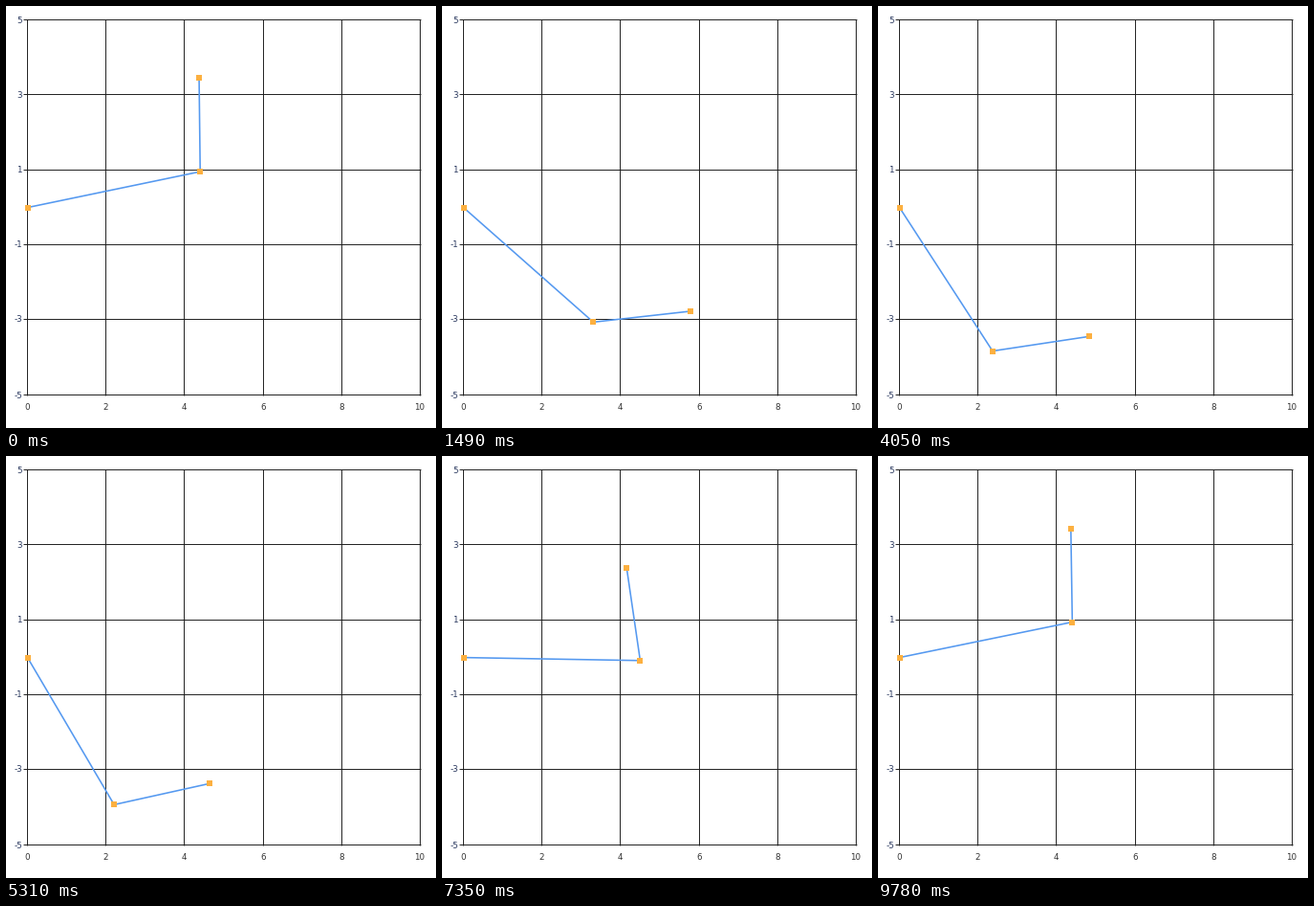
Recreate the animation shown at these times as a matplotlib script. Size 450 by 441 pixels, loop 9870 ms.

```python
import numpy as np
import matplotlib.pyplot as plt
from matplotlib.animation import FuncAnimation

W, H, DPI = 450, 441, 100
PT = 72 / DPI  # one pixel in points
LOOP, STEP, HOLD = 9870, 30, 3  # ms, ms, drawings per chart update
DT = 0.01

# Two-link arm whose tip is pulled to one goal, then to the other
L1, L2 = 4.5, 2.5
GAIN = np.array([0.065, 0.25])
LOW, HIGH = (4.45, -3.3), (4.45, 3.6)
GO_LOW, GO_HIGH = 0.66, 5.97  # seconds


def joints_at(q):
    a, b = q[0], q[0] + q[1]
    x = np.cumsum([0, L1 * np.cos(a), L2 * np.cos(b)])
    y = np.cumsum([0, L1 * np.sin(a), L2 * np.sin(b)])
    return x, y


def velocity(q, goal):
    """Transposed Jacobian times the tip error."""
    x, y = joints_at(q)
    ex, ey = goal[0] - x[2], goal[1] - y[2]
    turn = [x[2] * ey - y[2] * ex,
            (x[2] - x[1]) * ey - (y[2] - y[1]) * ex]
    return GAIN * turn


def simulate():
    q = np.radians([12.6, 77.4])
    n = int(LOOP / 1000 / DT)
    for _ in range(2):  # the first pass settles into the cycle
        path = []
        for k in range(n):
            path.append(q)
            goal = LOW if GO_LOW <= k * DT < GO_HIGH else HIGH
            mid = q + velocity(q, goal) * DT / 2
            q = q + velocity(mid, goal) * DT
    return path


path = simulate()

fig = plt.figure(figsize=(W / DPI, H / DPI), dpi=DPI, facecolor="white")
ax = fig.add_axes([0, 0, 1, 1])
ax.set(xlim=(0, W), ylim=(H, 0))
ax.axis("off")


def rule(x, y):
    ax.plot(x, y, color="#1c1c1c", lw=0.95 * PT, solid_capstyle="butt",
            zorder=1)


def label(x, y, s, color, **kw):
    ax.text(x, y, s, color=color, fontsize=8.8 * PT, family="DejaVu Sans",
            va="center_baseline", **kw)


for i in range(6):
    gx = round(22 + 82.2 * i)
    gy = round(13.8 + 78.4 * i)
    rule([gx, gx], [14, 407])
    rule([18, 434], [gy, gy])
    label(gx, 418, str(2 * i), "#333333", ha="center")
    label(17, gy, str(5 - 2 * i), "#26355c", ha="right")

arm, = ax.plot([], [], color="#5599f0", lw=1.6 * PT, zorder=3)
dots, = ax.plot([], [], ls="none", marker="s", ms=6.8 * PT, mew=0,
                color="#fcb040", snap=False, zorder=4)


def draw(i):
    t = max(0, (i + 2) // HOLD * HOLD - 2) * STEP / 1000
    x, y = joints_at(path[round(t / DT)])
    px, py = 22.5 + 41.1 * x, 210.6 - 39.2 * y
    arm.set_data(px, py)
    dots.set_data(px, py)
    return arm, dots


anim = FuncAnimation(fig, draw, frames=LOOP // STEP, interval=STEP,
                     repeat=True, repeat_delay=0, blit=False)
plt.show()
```
